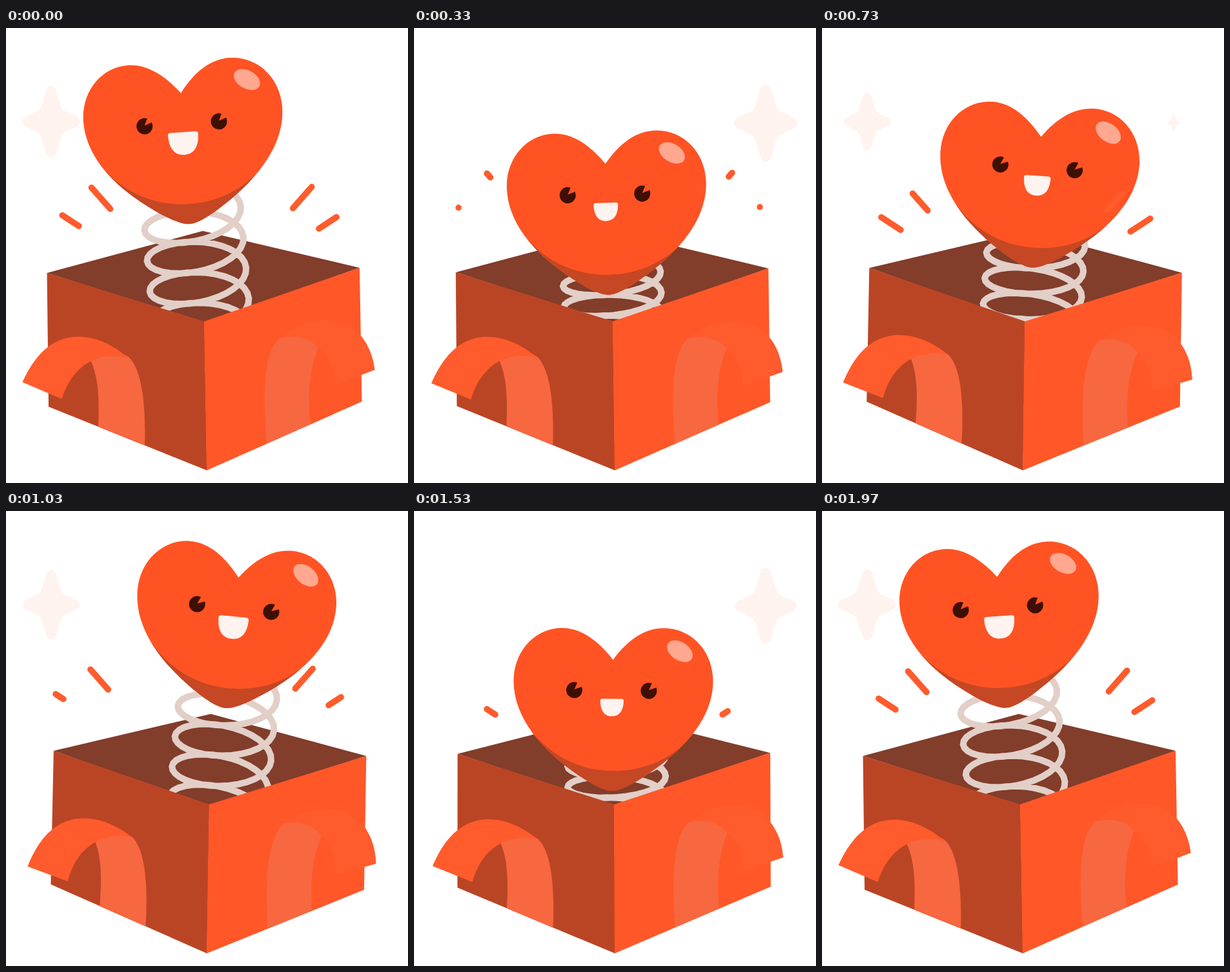
Recreate the animation shown at these times as an HTML page. Size 623 by 704 pixels, loop 2.01 s.

```html
<!DOCTYPE html>
<html lang="en">
<head>
<meta charset="utf-8">
<title>Heart in a box</title>
<style>
  html, body { margin: 0; width: 100%; height: 100%; overflow: hidden; background: #fff; }
  svg { display: block; width: 100vw; height: 100vh; }
</style>
</head>
<body>
<svg viewBox="0 0 623 704">
  <defs>
    <path id="heartShape" d="M1-203C-22-232-48-252-78-252C-120-252-153-216-153-170C-153-112-108-62-52-24C-30-9-11 0 0 0C11 0 30-9 52-24C110-62 156-112 156-170C156-217 122-252 80-252C50-252 24-234 1-203Z"/>
    <clipPath id="heartClip"><use href="#heartShape"/></clipPath>
    <path id="starShape" fill="#fff3ef" d="M0-55Q6-55 8-48L13-31Q16-20 20-17L37-9Q45-6 45 0Q45 6 37 9L20 17Q16 20 13 31L8 48Q6 55 0 55Q-6 55-8 48L-13 31Q-16 20-20 17L-37 9Q-45 6-45 0Q-45-6-37-9L-20-17Q-16-20-13-31L-8-48Q-6-55 0-55Z"/>
    <g id="eye">
      <circle r="12.5" fill="#3e0f02"/>
      <path d="M0-1L6-14H14V-6Z" fill="#ff5324"/>
    </g>
  </defs>

  <use id="starLeft" href="#starShape"/>
  <use id="starRight" href="#starShape"/>

  <path id="inside" fill="#823d2b" d="M63.500 379L305 314L548 371L307 456Z"/>
  <path id="spring" fill="none" stroke="#e2cfc8" stroke-width="10"/>

  <g id="box">
    <path fill="#ba4525" d="M63.500 379L307.500 454L311.500 684.500L66 586Z"/>
    <path fill="#ff5728" d="M307 454L548 371L551.500 578L311 684.500Z"/>
    <path fill="#f76740" d="M128 508C146 540 144 585 143 617L215 646C217 585 211 528 190 509C170 495 140 500 128 508Z"/>
    <path id="flapLeft" fill="#ff5b2c" d="M25.500 548C45 505 72 478 112 477.500C145 478 172 495 190 511C150 500 105 515 86.500 574Z"/>
    <path fill="#f76740" d="M404 643C398 570 398 500 425 479C445 472 475 478 484 495C468 530 468 580 472 613Z"/>
    <path id="flapRight" fill="#ff5b2c" d="M425 480C445 462 470 452 495 452C540 452 566 485 571.500 529L511 552C509 530 500 505 484 495C470 477 445 475 425 480Z"/>
  </g>

  <g id="heart">
    <use href="#heartShape" fill="#ff5324"/>
    <path clip-path="url(#heartClip)" fill="#c54724" d="M-132-100L-124-90C-90-50-45-31 2-31C50-31 95-50 128-90L136-100V10H-132Z"/>
    <ellipse rx="22" ry="14" transform="translate(104.500 -216.500) rotate(33)" fill="#ffa78f"/>
    <use href="#eye" x="-59" y="-156"/>
    <use href="#eye" x="56.500" y="-155"/>
    <path id="mouth" fill="#fff3ef" d="M-19 0H19Q23.500 0 23.500 4C23 23 16 35 0 35C-16 35-23 23-23.500 4Q-23.500 0-19 0Z"/>
  </g>

  <g id="dashes" stroke="#ff5b2c" stroke-width="9.500" stroke-linecap="round"></g>
</svg>
<script>
  const LOOP = 2010, FRAME = 100 / 3;
  const $ = id => document.getElementById(id);
  const place = (id, transform) => $(id).setAttribute('transform', transform);
  const clamp = v => Math.min(1, Math.max(0, v));
  const ease = (f, from, to) => (1 - Math.cos(Math.PI * clamp((f - from) / (to - from)))) / 2;
  const steep = u => u < .5 ? Math.pow(2 * u, 3.5) / 2 : 1 - Math.pow(2 - 2 * u, 3.5) / 2;

  // frame, x of the heart's tip, slope
  const tipKeys = [[0, 285, 0], [10, 302, 1.9], [22, 324.7, 2], [30, 340.5, 0],
                   [37, 327, -2.2], [46, 307, -2], [60, 285, 0]];

  function tipX(f) {
    const i = tipKeys.findIndex(k => k[0] > f);
    const [f0, x0, m0] = tipKeys[i - 1], [f1, x1, m1] = tipKeys[i];
    const d = f1 - f0, u = (f - f0) / d, v = 1 - u;
    return v * v * ((1 + 2 * u) * x0 + u * d * m0) + u * u * ((3 - 2 * u) * x1 - v * d * m1);
  }

  // Each dash is a line from inner to outer end, trimmed between tail and head.
  const dashFrames = [15, 16, 22, 30, 31, 37, 40];
  const dashes = [
    { line: [126, 315, 69, 278], head: [.1, .23, .6, .68, .86, 1, 1], tail: [0, 0, .07, .23, .65, 1, 1] },
    { line: [478, 315, 536, 277], head: [0, .14, .53, .59, .71, .98, 1], tail: [0, 0, 0, .12, .38, .96, 1] },
    { line: [167, 286, 113, 225], head: [0, 0, .49, .64, .67, .97, 1], tail: [0, 0, .06, .1, .16, .85, .9] },
    { line: [441, 283, 493, 224], head: [0, 0, .47, .63, .66, .95, 1], tail: [0, 0, .03, .07, .14, .9, .9] }
  ];
  for (const dash of dashes) {
    dash.el = document.createElementNS('http://www.w3.org/2000/svg', 'line');
    $('dashes').append(dash.el);
  }

  function keyed(values, f) {
    const last = dashFrames.length - 1;
    if (f >= dashFrames[last]) return values[last];
    const i = dashFrames.findIndex(k => k > f);
    if (i < 1) return 0;
    const u = (f - dashFrames[i - 1]) / (dashFrames[i] - dashFrames[i - 1]);
    return values[i - 1] + (values[i] - values[i - 1]) * u;
  }

  function drawDash({ el, line: [x0, y0, x1, y1], head, tail }, phase) {
    const f = phase < 13 ? phase + 30 : phase;
    const h = keyed(head, f), t = keyed(tail, f);
    const at = { x1: x0 + (x1 - x0) * t, y1: y0 + (y1 - y0) * t,
                 x2: x0 + (x1 - x0) * h + .01, y2: y0 + (y1 - y0) * h };
    for (const name in at) el.setAttribute(name, at[name]);
    el.setAttribute('visibility', h > 0 && f < 42 ? 'visible' : 'hidden');
  }

  function springPath(pitch) {
    const points = [];
    for (let n = 2; n <= 6.73; n += 1 / 32) {
      const a = 2 * Math.PI * n;
      points.push((-76 * Math.cos(a)).toFixed(2) + ' ' + (pitch * (.74 * Math.sin(a) - n)).toFixed(2));
    }
    return 'M' + points.join('L');
  }

  function star(id, x, y, size) {
    place(id, `translate(${x} ${y}) scale(${size})`);
  }

  function draw(f) {
    const phase = f % 30;
    const sway = (1 - Math.cos(Math.PI * f / 30)) / 2;
    const rise = ease(phase, 14, 30);
    const drop = ease(phase, 0, 14) - rise;
    const squeeze = ease(phase, 0, 11) - rise;
    const boxTurn = f < 30 ? steep(f / 30) : 1 - steep(phase / 30);

    const turn = `rotate(${1.92 * boxTurn} 311 684)`;
    place('box', turn);
    place('inside', turn);
    place('flapLeft', `rotate(${-4.6 * sway} 168 508)`);
    place('flapRight', `rotate(${3.55 * sway} 440 488)`);

    $('spring').setAttribute('d', springPath(47.4 - 15.4 * squeeze));
    place('spring', `translate(315 590) rotate(${-5 + 10.5 * sway})`);

    place('heart', `translate(${tipX(f)} ${303.3 + 135 * drop}) rotate(${-4.2 + 9.7 * sway})`);
    place('mouth', `translate(-.5 -142.500) scale(${1 - .24 * drop})`);

    star('starLeft', 70, 145, 1 - ease(phase, 0, 10.2) + ease(phase, 15.5, 24.5));
    star('starRight', 545, 147, 1.09 * (ease(phase, 1, 9) - ease(phase, 15, 25)));

    for (const dash of dashes) drawDash(dash, phase);
  }

  const start = performance.now();
  function tick() {
    const t = (performance.now() - start) % LOOP;
    draw(Math.min(59, Math.floor((t + 4) / FRAME)));
    requestAnimationFrame(tick);
  }
  tick();
</script>
</body>
</html>
```
